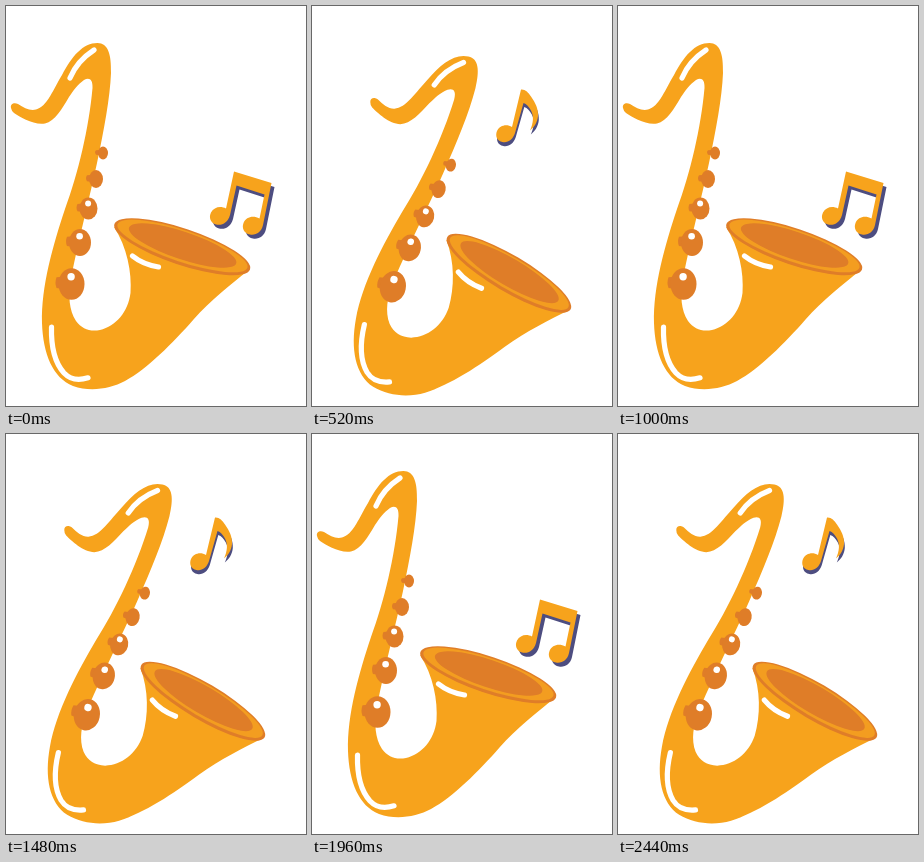
These frames come from a looping animation (300x400 px, 2.88 s). An HTML page:

```html
<!DOCTYPE html>
<html lang="en">
<head>
<meta charset="utf-8">
<title>Swinging saxophone</title>
<style>
  html, body { margin: 0; width: 100%; height: 100%; overflow: hidden; background: #fff; }
  svg { display: block; width: 100vw; height: 100vh; }
  .gold { fill: #f7a31c; }
  .rust { fill: #df7d28; }
  .navy { fill: #4d4d80; }
  .shine { fill: none; stroke: #fff; stroke-width: 5.2; stroke-linecap: round; stroke-linejoin: round; }
</style>
</head>
<body>
<svg viewBox="0 0 300 400">
  <defs>
    <path id="pair" fill-rule="evenodd" d="M228 165.500L265.500 177L257 219C255.500 226 250 229.500 244 228.500
      C238 227.500 235.500 222 237.500 217C240 211 247 209 253.500 212.500L258.500 188.500L230.500 179.500L224 209
      C222 216.500 216 220 210 218.500C204.500 217 202.500 211.500 205 206.500C208 201 214.500 199.500 220 202.500Z"/>
    <path id="single" d="M209 83.500C213 83 216.500 86.500 219 90.500C223.500 97 226.500 103 226 110C225.500 116 222.500 121 218 124.500
      C221.500 117 222 110 219 104.500C217 101 214.500 98 211.500 97L203 127C201 133.500 196 137 190.500 136
      C185 135 183 130 185 125C187.500 119.500 194.500 117.500 200 121Z"/>
  </defs>

  <g id="sax">
    <path class="gold" d="M5 102C4 98 8 96 12 98C18 102 24 105 30 103.500C41 101 48 82 56 69
      C66 50 77 37 91.500 37C102 37 105.500 48 105 67C104 92 98 124 91 157C84 190 73 232 65 272
      C62 290 63 304 70 315C76 323 84 326 94 324C110 320 122 306 124.500 287
      C126 266 121 241 108 221L243 264C225 278 205 294 187.500 313.500C167 337 141 363 119 375
      C104 383 84 386 67 380C47 372 37 348 36 317C35 281 47 239 59 203C72 168 83 122 86.500 82
      C87 73 83 71 78 74C71 79 68 84 63 91C56 103 49 115 39 117.500C28 119.500 14 111 8 107Q5.500 105 5 102Z"/>
    <g transform="translate(176.200 240.700) rotate(18.500)">
      <ellipse class="rust" rx="71.500" ry="18.200"/>
      <ellipse fill="#f39d20" cy="-.8" rx="68.500" ry="15.800"/>
      <ellipse class="rust" cy="-1.300" rx="56.500" ry="13.800"/>
    </g>
    <path class="shine" d="M64 72Q71 55 88 44"/>
    <path class="shine" d="M126.500 250Q137 258.500 152.500 261"/>
    <path class="shine" d="M45.500 321C45 340 49 357 58 367Q67 376.500 82 371.800"/>
    <g id="keys"></g>
  </g>

  <g id="duo">
    <use href="#pair" class="navy" x="3" y="4"/>
    <use href="#pair" class="gold"/>
  </g>
  <g id="solo" visibility="hidden">
    <use href="#single" class="navy" x=".8" y="4"/>
    <use href="#single" class="gold"/>
  </g>
</svg>
<script>
  const LOOP = 2880;
  const CUTS = [520, 1000, 1480, 1960, 2440];
  const TILT = 'translate(74.600 -4.800) rotate(12)';
  const get = id => document.getElementById(id);

  // x, y, rx, ry, highlight radius
  const keys = [
    [97, 147, 5, 6.5, 0],
    [90, 173, 7, 9, 0],
    [82.5, 202.5, 9, 11, 3],
    [74, 236.5, 11, 13.5, 3.3],
    [65.5, 278, 13, 15.8, 3.7]
  ];

  get('keys').innerHTML = keys.map(([x, y, rx, ry, r]) => {
    const stem = `M${x} ${y - ry * .5}L${x - rx - 2} ${y - ry * .42}Q${x - rx - 4} ${y - 1} ${x - rx - 2} ${y + ry * .25}L${x} ${y + ry * .4}Z`;
    const shine = r ? `<circle cx="${x - .4}" cy="${y - ry * .46}" r="${r}" fill="#fff"/>` : '';
    return `<path class="rust" d="${stem}"/><ellipse class="rust" cx="${x}" cy="${y}" rx="${rx}" ry="${ry}"/>${shine}`;
  }).join('');

  function draw(now) {
    const t = now % LOOP;
    const tilted = CUTS.filter(cut => cut <= t).length % 2 === 1;
    get('sax').setAttribute('transform', tilted ? TILT : '');
    get('duo').setAttribute('visibility', tilted ? 'hidden' : 'visible');
    get('solo').setAttribute('visibility', tilted ? 'visible' : 'hidden');
  }

  const start = performance.now();
  function tick() {
    draw(performance.now() - start);
    requestAnimationFrame(tick);
  }
  tick();
</script>
</body>
</html>
```
